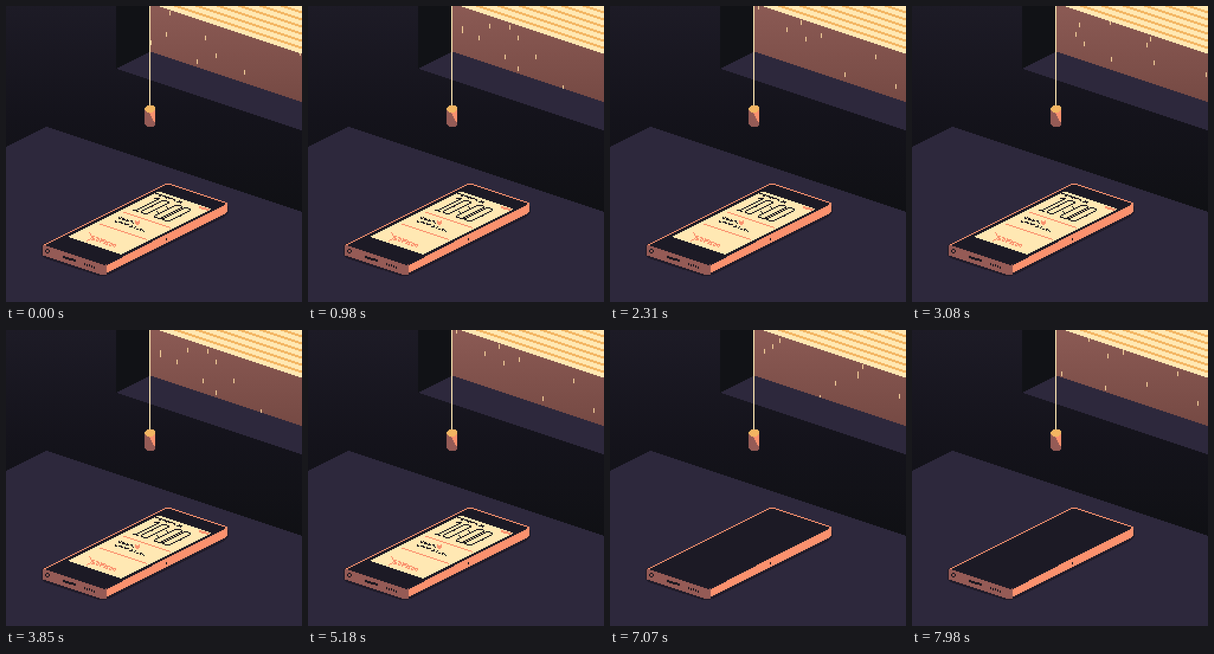
Write an HTML page with a canvas that moves like this. It is 500 px wide and 500 px high and loops after 8 s.

```html
<!DOCTYPE html>
<html lang="en">
<head>
<meta charset="utf-8">
<title>Rainy window</title>
<style>
html, body { margin: 0; width: 100%; height: 100%; overflow: hidden; background: #14131a; }
canvas { display: block; width: 100vw; height: 100vh; image-rendering: pixelated; }
</style>
</head>
<body>
<canvas id="stage" width="250" height="250"></canvas>
<script>
const ctx = document.getElementById('stage').getContext('2d');
const LOOP = 8000, STEP = 70, RAIN = 41, DROPS = 74, SCREEN_OFF = 2 * RAIN;
const CREAM = '#ffe8b3', ORANGE = '#f3b562', SALMON = '#fa916e', BROWN = '#955b56';
const DARK = '#1c1a25', INK = '#1b1820', TABLE = '#2d283c', RECESS = '#111216';

const hash = n => { const s = Math.sin(n * 127.1 + 31.7) * 43758.5453; return s - Math.floor(s); };
// Lower edges of the blind and of the wall, per pixel column
const blindY = x => Math.max(0, Math.floor((x - 127) / 3));
const sillY = x => Math.floor((x - 4.5) / 3);

function box(color, x, y, w = 1, h = 1) {
  ctx.fillStyle = color;
  ctx.fillRect(x, y, w, h);
}

function fade(stops, y1) {
  const g = ctx.createLinearGradient(0, 0, 0, y1);
  stops.forEach((c, i) => g.addColorStop(i / (stops.length - 1), c));
  return g;
}

// Scanline fill, so that every edge stays on the pixel grid
function poly(color, ...pts) {
  const ys = pts.map(p => p[1]);
  ctx.fillStyle = color;
  for (let y = Math.floor(Math.min(...ys)); y < Math.max(...ys); y++) {
    const c = y + 0.5, xs = [];
    pts.forEach(([x0, y0], i) => {
      const [x1, y1] = pts[(i + 1) % pts.length];
      if ((y0 <= c) !== (y1 <= c)) xs.push(x0 + (c - y0) / (y1 - y0) * (x1 - x0));
    });
    xs.sort((a, b) => a - b);
    for (let i = 0; i + 1 < xs.length; i += 2) {
      const a = Math.round(xs[i]);
      ctx.fillRect(a, y, Math.round(xs[i + 1]) - a, 1);
    }
  }
}

function line(color, ...pts) {
  for (let i = 1; i < pts.length; i++) {
    const [x0, y0] = pts[i - 1], [x1, y1] = pts[i];
    const n = Math.max(1, Math.ceil(Math.max(Math.abs(x1 - x0), Math.abs(y1 - y0))));
    for (let k = 0; k <= n; k++)
      box(color, Math.round(x0 + (x1 - x0) * k / n), Math.round(y0 + (y1 - y0) * k / n));
  }
}

function room() {
  box(fade(['#1d1b26', '#14131b', '#0f1013'], 190), 0, 0, 250, 250);
  poly(RECESS, [93, 0], [122, 0], [122, 39], [93, 53.5]);
  poly(TABLE, [93, 53], [122, 38.5], [250, 78], [250, 105.2]);
  const wall = fade(['#8b5a54', '#764a44'], 80);
  for (let x = 122; x < 250; x++) {
    const b = blindY(x);
    box(wall, x, 0, 1, sillY(x));
    box(CREAM, x, 0, 1, b);
    if (b) for (let y = b - 6; y > -2; y -= 6) box(ORANGE, x, y, 1, 2);
  }
  poly(TABLE, [0, 119], [34, 102], [250, 174], [250, 250], [0, 250]);
}

function cord() {
  box(CREAM, 121, 0, 1, 85);
  poly(BROWN, [117, 86], [126, 86], [126, 100], [124, 102], [119, 102], [117, 100]);
  poly(SALMON, [121, 90], [126, 86], [126, 99], [125, 98]);
  poly(ORANGE, [119, 84], [124, 84], [126, 86], [126, 87], [123, 90], [120, 90], [117, 88], [117, 86]);
}

function phone() {
  poly('#1f1b29', [30, 202], [33, 200], [187, 168], [188, 170], [188, 174], [185, 178], [87, 227], [80, 228.5], [32, 213], [30, 210]);
  poly(BROWN, [31, 202], [33, 201], [85, 218], [85, 227], [81, 227], [32, 211], [31, 210]);
  poly(SALMON, [85, 219], [185, 167], [187, 167], [187, 173], [184, 176], [88, 224], [85, 225.5]);
  poly(DARK, [32, 202], [134, 151], [138, 151], [185, 166.5], [185, 168], [86, 217.5], [83, 219]);
  line(SALMON, [32, 201], [134, 150], [138, 150], [186, 166]);
  line(BROWN, [31, 203], [31, 210]);
  // sockets and speaker holes
  box(INK, 34, 205, 2, 4);
  box(INK, 33, 206, 4, 2);
  box(BROWN, 34, 206, 2, 2);
  line(INK, [48, 211], [58, 214]);
  line(INK, [48, 212], [58, 215]);
  for (let i = 0; i < 5; i++) box(INK, 66 + i * 2, 217 + Math.round(i * 0.67), 1, 2);
  box(INK, 135, 196, 1, 2);
}

// A row of unreadably small lettering that follows the phone's width
function scribble(color, x, y, n, rows, seed) {
  for (let i = 0; i < n; i++)
    for (let k = 0; k < rows; k++)
      if (hash(seed + i * rows + k) < 0.55)
        box(color, x + i, y + Math.floor(i / 3) + k);
}

// Digits lie in the screen plane: u runs across the phone, v along it
function clock() {
  const draw = (u, ...pts) =>
    line(INK, ...pts.map(([a, v]) => [126.5 + (u + a) * 3 - v * 2, 161.5 + u + a + v]));
  const zero = u => draw(u, [0.4, 0], [1.4, 0], [1.8, 0.6], [1.8, 9.4], [1.4, 10], [0.4, 10], [0, 9.4], [0, 0.6], [0.4, 0]);
  draw(0, [0, 0.8], [0.7, 0], [0.7, 10]);
  draw(0, [0, 10], [1.4, 10]);
  [2, 5.8, 8.2].forEach(zero);
  [3, 7].forEach(v => draw(4.7, [0, v], [0.3, v]));
}

function display() {
  poly(CREAM, [52, 195], [129, 156.5], [173, 171], [173, 172], [97, 210]);
  scribble(INK, 126, 158, 23, 2, 4);
  line(SALMON, [163, 169], [171, 171]);
  line(SALMON, [163, 170], [170, 172]);
  clock();
  line(SALMON, [99, 173.67], [138, 186.67]);
  line(SALMON, [79, 183.67], [118, 196.67]);
  scribble(INK, 95, 178, 13, 2, 80);
  scribble(INK, 92, 181, 25, 2, 150);
  box(SALMON, 109, 181, 1, 3);
  box(SALMON, 112, 181, 1, 3);
  box(SALMON, 110, 182, 2, 3);
  line(SALMON, [70, 191], [72, 195], [68, 198]);
  scribble(SALMON, 72, 194, 21, 4, 40);
}

// Drops enter under the blind at an even rate, half of them falling twice as fast
function rain(step) {
  for (let i = 0; i < DROPS; i++) {
    const x = 122 + Math.floor(hash(i) * 128);
    const speed = hash(i + 200) < 0.5 ? 6 : 12;
    const age = (step - Math.floor(i * RAIN / DROPS) + RAIN) % RAIN;
    const y = blindY(x) - 3 + Math.floor(hash(i + 400) * speed) + age * speed;
    const top = Math.max(y, blindY(x)), end = Math.min(y + 4, sillY(x));
    if (end > top) box('#edc896', x, top, 1, end - top);
  }
}

let last = -1;
function render(ms) {
  const step = Math.floor(ms % LOOP / STEP);
  if (step === last) return;
  last = step;
  room();
  rain(step % RAIN);
  cord();
  phone();
  if (step < SCREEN_OFF) display();
}

const start = performance.now();
function tick() {
  render(performance.now() - start);
  requestAnimationFrame(tick);
}
tick();
</script>
</body>
</html>
```
